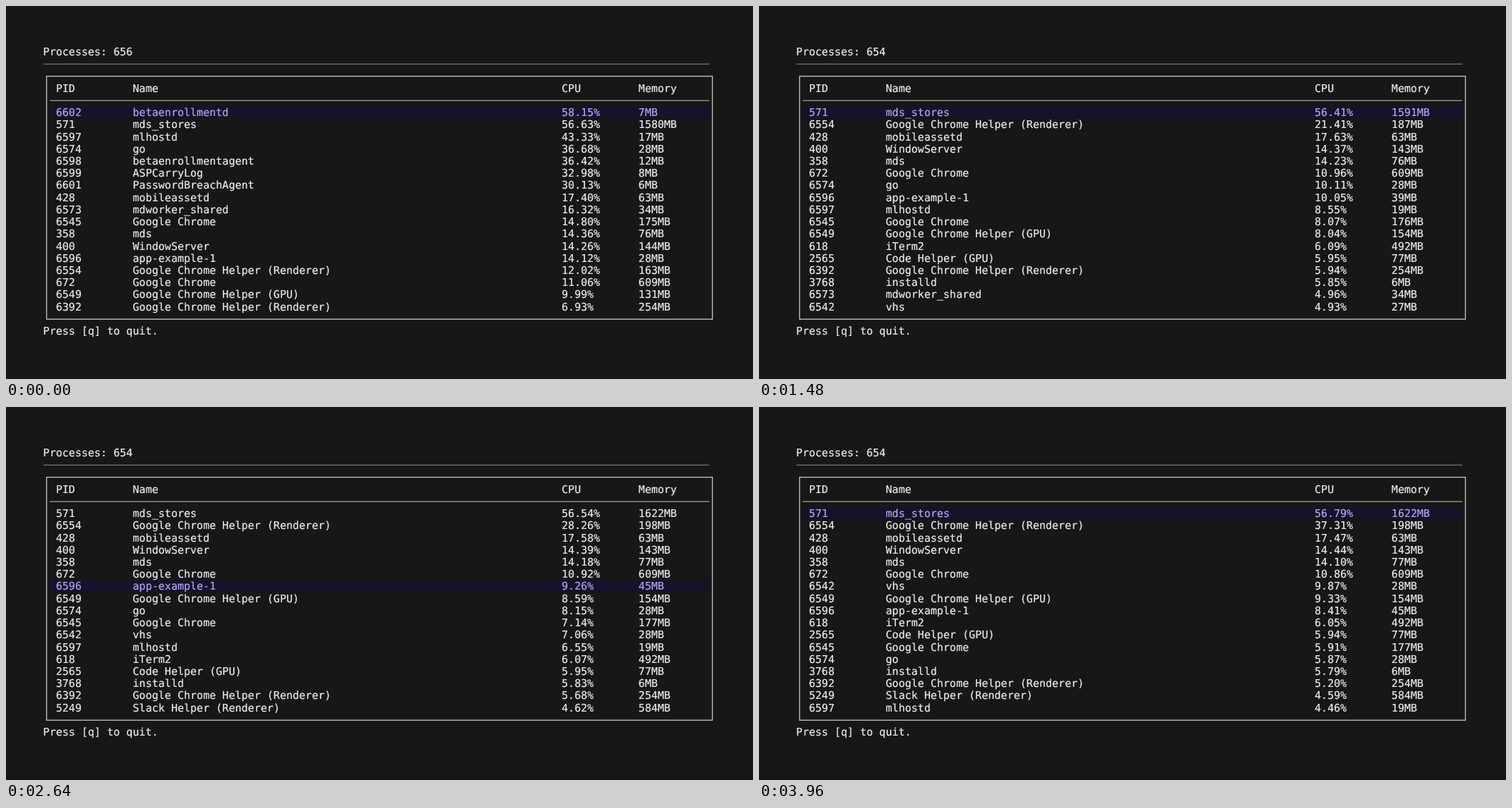
An HTML page for the animation above (4.04 s loop, 1058 by 529 pixels).

```html
<!DOCTYPE html>
<html lang="en">
<head>
<meta charset="utf-8">
<title>Process monitor</title>
<style>
  html, body { margin: 0; width: 100%; height: 100%; overflow: hidden; background: #171717; }
  svg { display: block; width: 1058px; height: 529px; }
  text {
    font: 15.06px "DejaVu Sans Mono", monospace;
    font-variant-ligatures: none;
    text-rendering: geometricPrecision;
    fill: #ececec;
    stroke: #ececec;
    stroke-width: 0.2;
  }
  .selected text { fill: #b8a2fa; stroke: #b8a2fa; }
  #bar { fill: #161229; }
  .frame { fill: none; stroke: #c9c9c9; stroke-width: 1.3; }
  .rule { stroke: #75757b; stroke-width: 1.2; }
  .head-rule { stroke: #a4a4a4; stroke-width: 1.2; }
</style>
</head>
<body>
<svg id="stage" viewBox="0 0 1058 529">
  <path class="rule" d="M53 82.4H996"/>
  <rect class="frame" x="57.5" y="99.6" width="943" height="344.6"/>
  <path class="head-rule" d="M62 134.1H996"/>
  <rect id="bar" x="62.5" width="933.2" height="17.22"/>
</svg>
<script>
const LOOP = 4040, FRAME = 40;
const LEFT = 53, TOP = 56.7, CELL = 9.067, LINE = 17.22;
const FIRST_ROW = 5, ROWS = 17, COLUMNS = [2, 14, 81, 93];

// Process ages, measured in refresh intervals.
const OLD = 320, RECENT = 2.85, NEW = 0.277;
const WAKE = 2; // refresh at which load and memory growth change

const clamp = (x, lo, hi) => Math.min(hi, Math.max(lo, x));

// load: CPU use before and after WAKE; grow: memory added before and after it.
function run(pid, name, age, cpu, memory, { load = [0, 0], grow = [0, 0] } = {}) {
  return { pid, name, age, cpu, memory, load, grow };
}

const processes = [
  run(358, 'mds', OLD, 14.36, 76, { grow: [0, 1] }),
  run(400, 'WindowServer', OLD, 14.26, 144, { load: [28, 22], grow: [-1, 0] }),
  run(428, 'mobileassetd', OLD, 17.4, 63, { load: [64, 0] }),
  run(571, 'mds_stores', OLD, 56.63, 1580, { load: [0, 98], grow: [0, 42] }),
  run(618, 'iTerm2', OLD, 6.125, 492, { load: [2, 2] }),
  run(672, 'Google Chrome', OLD, 11.06, 609),
  run(2565, 'Code Helper (GPU)', OLD, 5.958, 77, { load: [5, 5] }),
  run(3768, 'installd', OLD, 5.9, 6),
  run(5249, 'Slack Helper (Renderer)', OLD, 4.68, 584),
  run(6392, 'Google Chrome Helper (Renderer)', 18.1, 6.93, 254),
  run(6542, 'vhs', RECENT, 2, 27, { load: [1.83, 19.5], grow: [0, 1] }),
  run(6545, 'Google Chrome', RECENT, 14.8, 175, { load: [1.68, 1.68], grow: [1, 1] }),
  run(6549, 'Google Chrome Helper (GPU)', RECENT, 9.99, 131, { load: [3.37, 11.83], grow: [23, 0] }),
  run(6554, 'Google Chrome Helper (Renderer)', RECENT, 12.02, 163, { load: [11.36, 68.3], grow: [20, 15] }),
  run(6573, 'mdworker_shared', 1.31, 16.32, 34),
  run(6574, 'go', 1.142, 36.68, 28),
  run(6596, 'app-example-1', 0.5, 14.12, 28, { load: [10.8, 6.5], grow: [9, 8] }),
  run(6597, 'mlhostd', NEW, 43.33, 17, { load: [8, 0], grow: [2, 0] }),
  run(6598, 'betaenrollmentagent', NEW, 36.42, 12),
  run(6599, 'ASPCarryLog', NEW, 32.98, 8),
  run(6601, 'PasswordBreachAgent', NEW, 30.13, 6, { load: [1.88, 0], grow: [8, 0] }),
  run(6602, 'betaenrollmentd', 0.1, 58.15, 7)
];

// CPU is busy time over lifetime, so idle young processes fade quickly.
function cpuAt(p, n) {
  const before = Math.min(n, WAKE), after = n - before;
  return (p.cpu * p.age + p.load[0] * before + p.load[1] * after) / (p.age + n);
}

function memoryAt(p, n) {
  const before = Math.min(n / WAKE, 1), after = clamp((n - WAKE) / 2, 0, 1);
  return Math.round(p.memory + p.grow[0] * before + p.grow[1] * after ** 2);
}

function tableAt(n) {
  return processes
    .map(p => ({ p, cpu: cpuAt(p, n) }))
    .sort((a, b) => b.cpu - a.cpu)
    .slice(0, ROWS)
    .map(({ p, cpu }) => [p.pid, p.name, cpu.toFixed(2) + '%', memoryAt(p, n) + 'MB']);
}

const stage = document.getElementById('stage');
const bar = document.getElementById('bar');

function add(tag, parent) {
  return parent.appendChild(document.createElementNS('http://www.w3.org/2000/svg', tag));
}

function label(parent, column, line, content = '') {
  const el = add('text', parent);
  el.setAttribute('x', LEFT - 0.4 + column * CELL);
  el.setAttribute('y', Math.round(TOP + line * LINE + 13.3));
  el.textContent = content;
  return el;
}

const countLabel = label(stage, 0, 0);
['PID', 'Name', 'CPU', 'Memory'].forEach((s, i) => label(stage, COLUMNS[i], 3, s));
label(stage, 0, 23, 'Press [q] to quit.');

const rows = Array.from({ length: ROWS }, (_, i) => {
  const group = add('g', stage);
  return { group, texts: COLUMNS.map(c => label(group, c, FIRST_ROW + i)) };
});

// How many events of a steady series have happened by time t.
const events = (t, first, every, most) => clamp(Math.floor((t - first) / every) + 1, 0, most);

let shownRefresh, shownRow;

function draw(time) {
  const t = Math.floor(time / FRAME) * FRAME;
  const refresh = events(t, 160, 656, 6);
  const selected = events(t, 1930, 140, 7) - events(t, 3540, 67, 7);
  if (refresh !== shownRefresh) {
    const exited = Math.ceil(Math.min(refresh, 3) / 2);
    countLabel.textContent = 'Processes: ' + (656 - exited);
    const table = tableAt(refresh);
    rows.forEach((row, i) => row.texts.forEach((el, c) => { el.textContent = table[i][c]; }));
    shownRefresh = refresh;
  }
  if (selected !== shownRow) {
    bar.setAttribute('y', TOP + (FIRST_ROW + selected) * LINE);
    rows.forEach((row, i) => row.group.classList.toggle('selected', i === selected));
    shownRow = selected;
  }
}

const start = performance.now();
function tick() {
  draw((performance.now() - start) % LOOP);
  requestAnimationFrame(tick);
}
tick();
</script>
</body>
</html>
```
